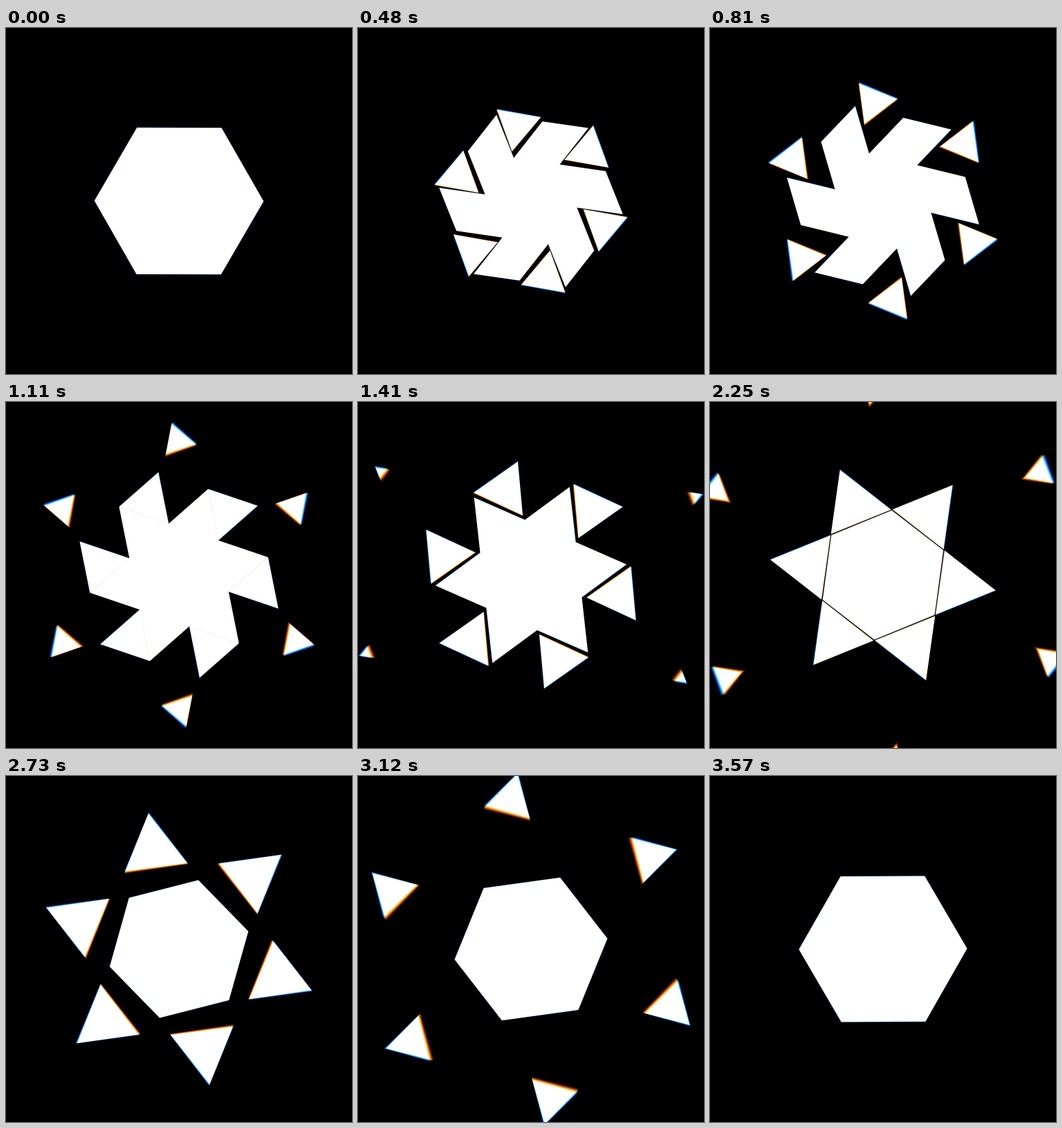
An HTML page with a canvas for the animation above (3.6 s loop, 500 by 500 pixels).

```html
<!DOCTYPE html>
<html lang="en">
<head>
<meta charset="utf-8">
<title>Hexagon shedding triangles</title>
<style>
  html, body { margin: 0; width: 100%; height: 100%; overflow: hidden; background: #000; }
  canvas { display: block; }
</style>
</head>
<body>
<canvas id="stage" width="500" height="500"></canvas>
<script>
const ctx = document.getElementById('stage').getContext('2d');
const LOOP = 3600, STEP = 30, STAGE = 1000, UNIT = 61;
const DEG = Math.PI / 180;

// Lattice coordinates (u, v): u along 0 degrees, v along 60 degrees.
const toXY = (u, v) => [u + v / 2, v * Math.sqrt(3) / 2];
const ARM = [[1, 0], [1, 1], [0, 2]];
const RINGS = [
  { at: toXY(4 / 3, 1 / 3), angle: -30 },
  { at: toXY(1 / 3, 4 / 3), angle: -30 },
  { at: toXY(2 / 3, 2 / 3), angle: 30 }
];

const turn = ([x, y], deg) => {
  const c = Math.cos(deg * DEG), s = Math.sin(deg * DEG);
  return [x * c - y * s, x * s + y * c];
};

function fill(points) {
  ctx.beginPath();
  for (const [x, y] of points) ctx.lineTo(x, y);
  ctx.closePath();
  ctx.fill();
}

// Core: pinwheel, then star, then plain hexagon.
function drawCore(stage) {
  const arm = ARM.slice(0, 3 - stage), points = [];
  for (let i = 0; i < 6; i++)
    for (const [u, v] of arm) points.push(turn(toXY(u, v), i * 60));
  fill(points);
}

// Six triangles fly outward while spinning and shrinking.
function drawRing({ at, angle }, sec) {
  const shrink = 0.262 * sec ** 3;
  if (sec < 0 || shrink >= 1) return;
  const far = 1 + sec ** 3 / (1.38 + 0.56 * sec * sec);
  const size = (1 - shrink) / Math.sqrt(3);
  for (let i = 0; i < 6; i++) {
    const [cx, cy] = turn(at, i * 60);
    fill([0, 120, 240].map(k => {
      const [x, y] = turn([size, 0], angle + i * 60 + k + 60 * shrink);
      return [cx * far + x, cy * far + y];
    }));
  }
}

function drawScene(ms) {
  const t = (ms + LOOP) % LOOP;
  const r = UNIT * 2 ** (t / LOOP);
  ctx.setTransform(r, 0, 0, r, 250, 250);
  ctx.rotate(60 * DEG * t / LOOP);
  drawCore(Math.min(2, Math.floor(t / STAGE)));
  RINGS.forEach((ring, k) => drawRing(ring, (t - k * STAGE) / 1000));
}

// Motion blur: red exposes first, blue last.
function render(ms) {
  ctx.setTransform(1, 0, 0, 1, 0, 0);
  ctx.globalCompositeOperation = 'source-over';
  ctx.fillStyle = '#000';
  ctx.fillRect(0, 0, 500, 500);
  ctx.globalCompositeOperation = 'lighter';
  for (let i = 0; i < 16; i++) {
    const rgb = [0, 3, 6].map(from => i >= from && i < from + 10 ? 26 : 0);
    ctx.fillStyle = `rgb(${rgb})`;
    drawScene(ms - 3 + i * 2);
  }
}

const start = performance.now();
let shown = -1;
function tick() {
  const ms = (performance.now() - start) % LOOP;
  const now = Math.floor(ms / STEP) * STEP;
  if (now !== shown) render(shown = now);
  requestAnimationFrame(tick);
}
tick();
</script>
</body>
</html>
```
